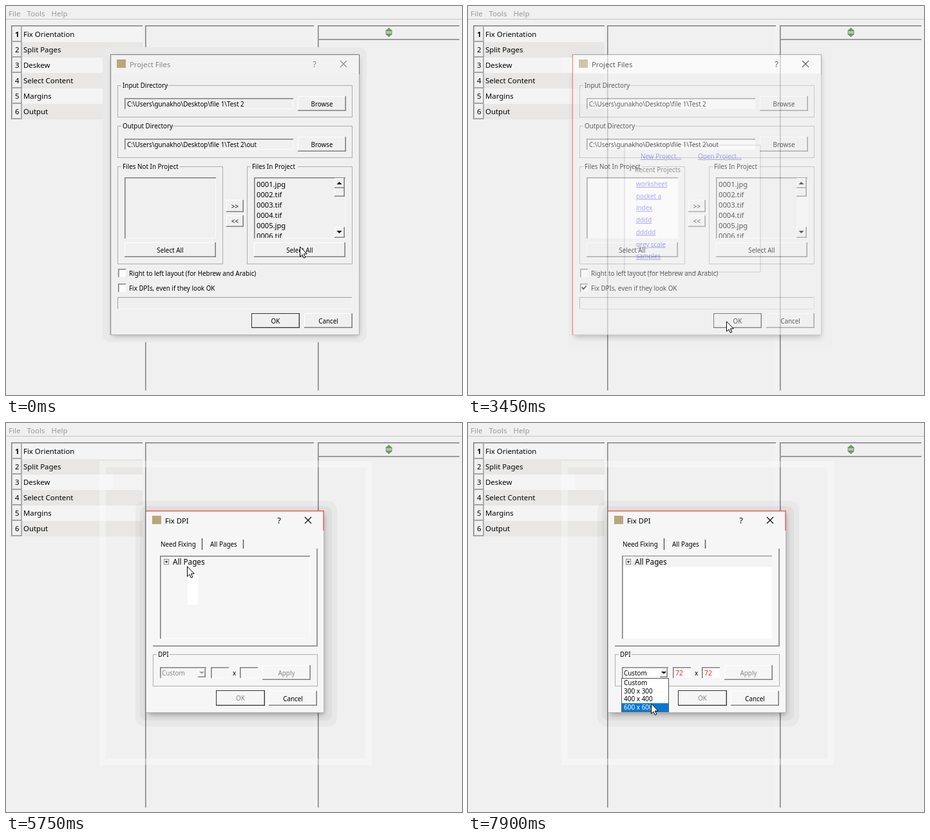
An HTML page that plays this animation: 708x604 px, repeating every 8 s.

```html
<!DOCTYPE html>
<html lang="en">
<head>
<meta charset="utf-8">
<title>Project setup</title>
<style>
html, body { margin: 0; width: 100%; height: 100%; overflow: hidden; background: #f0f0f0; }
svg { display: block; width: 708px; height: 604px; }
text { font-family: "Noto Sans", "Open Sans", sans-serif; white-space: pre; }
</style>
</head>
<body>
<svg id="stage" viewBox="0 0 708 604"></svg>
<script>
const LOOP = 8000;
const DARK = '#808080', BODY = '#f0f0f0', BLUE = '#0078d7', RED = '#f0463c';
const SMALL = 9.85, LARGE = 11.4;
const stage = document.getElementById('stage');

// Pointer rests: time, x, y
const pointer = [
  [0, 456, 373], [1780, 455, 376], [1930, 370, 393], [2060, 255, 424], [2180, 183, 438],
  [2640, 213, 442], [2760, 300, 461], [2880, 361, 474], [3030, 386, 484], [3160, 401, 489],
  [3570, 399, 484], [3690, 398, 481], [3810, 398, 477], [3950, 388, 459], [4080, 378, 447],
  [4230, 354, 412], [4380, 331, 394], [4500, 297, 373], [4630, 273, 360], [4770, 286, 263],
  [4930, 283, 236], [5080, 281, 228], [5210, 281, 222], [6150, 280, 232], [6270, 280, 278],
  [6420, 276, 310], [6540, 285, 352], [6660, 299, 382], [6810, 304, 387], [7300, 299, 405],
  [7450, 295, 423], [7600, 285, 434], [7900, 284, 435]
];

const rect = (x, y, w, h, fill, extra = '') =>
  `<rect x="${x}" y="${y}" width="${w}" height="${h}" fill="${fill}" ${extra}/>`;
const path = (d, stroke, width = 1, fill = 'none') =>
  `<path d="${d}" stroke="${stroke}" stroke-width="${width}" fill="${fill}"/>`;
const text = (x, y, str, size = SMALL, fill = '#000', extra = '') =>
  `<text x="${x}" y="${y}" font-size="${size}" fill="${fill}" ${extra}>${str}</text>`;
const centered = (x, y, str, size, fill) => text(x, y, str, size, fill, 'text-anchor="middle"');
const group = (opacity, body) => `<g opacity="${opacity}">${body}</g>`;

function sunken(x, y, w, h, fill) {
  return rect(x, y, w, h, fill) +
    path(`M${x} ${y + h - .5}H${x + w - .5}V${y}`, '#fbfbfb') +
    path(`M${x + .8} ${y + h}V${y + .8}H${x + w}`, DARK, 1.6);
}

function button(x, y, w, h, label, o = {}) {
  const shift = o.pressed ? 1 : 0;
  const edges = o.pressed
    ? path(`M${x + 1.5} ${y + h - 1}V${y + 1.5}H${x + w - 1}`, '#909090')
    : path(`M${x + .5} ${y + h - 1}V${y + .5}H${x + w - 1}`, '#fff') +
      path(`M${x} ${y + h - .8}H${x + w - .8}V${y}`, DARK, 1.6);
  const frame = o.focus ? rect(x + .5, y + .5, w - 1, h - 1, 'none', 'stroke="#333"') : '';
  return rect(x, y, w, h, o.fill || BODY) + edges + frame +
    centered(x + w / 2 + shift, y + h / 2 + 4 + shift, label, SMALL, o.off ? '#858585' : '#000');
}

function box(x, y, w, h, label, labelWidth, fill) {
  return rect(x + .5, y + .5, w, h, 'none', 'stroke="#adadad"') +
    rect(x + 6, y - 3, labelWidth, 7, fill) + text(x + 8, y + 4, label);
}

function checkbox(x, y, label, on) {
  return sunken(x, y, 12, 13, '#fdfdfd') +
    (on ? path(`M${x + 3} ${y + 5.5}l2.2 3 4.5-5`, '#000', 1.8) : '') + text(191, y + 11, label);
}

const arrow = (x, y, dir, fill = '#000') => `<path d="M${x - 4} ${y}h8l-4 ${4 * dir}z" fill="${fill}"/>`;

function titleBar(x, y, w, label, ink, fill) {
  const cx = x + w - 24, cy = y + 15;
  return rect(x, y, w, 30, fill) + rect(x + 10, y + 8, 14, 13, '#b8a67c') +
    text(x + 30, y + 19.5, label, 11.3, ink) +
    centered(cx - 45, y + 20, '?', 13, ink) +
    path(`M${cx - 5} ${cy - 5}l10 10m0-10l-10 10`, ink, 1.1);
}

function mainWindow() {
  let s = rect(0, 0, 708, 604, BODY);
  [['File', 4], ['Tools', 32.5], ['Help', 70.5]].forEach(([m, x]) => s += text(x, 15.5, m, 11.5, '#999'));
  s += path('M0 20.5H708', '#c4c4c4');
  ['Fix Orientation', 'Split Pages', 'Deskew', 'Select Content', 'Margins', 'Output'].forEach((name, i) => {
    const y = 32 + i * 24;
    s += rect(24, y, 188, 24, i % 2 ? '#e8e7e6' : '#f4f4f4') + rect(10, y, 14, 23, BODY) +
      path(`M10 ${y + 23}H24V${y}`, '#8b8b8b', 1.3) +
      text(14, y + 16, i + 1, LARGE, '#000', i ? '' : 'font-weight="700"') +
      text(27, y + 16, name, LARGE);
  });
  s += path('M8.8 176V30.8H212M216.8 597V30.8H478M484.8 51V30.8H704M484.8 597V52H704', DARK, 1.5);
  s += path('M478.5 31V597', '#f8f8f8') + rect(590, 38, 9, 6, '#b9bfb9', 'stroke="#777" stroke-width=".8"') +
    `<path d="M590.5 38l4-4 4 4zM590.5 44l4 4 4-4z" fill="#62b844" stroke="#3a7d2a" stroke-width=".7"/>`;
  return s;
}

function welcome() {
  const links = ['worksheet', 'pocket a', 'index', 'dddd', 'ddddd', 'grey scale', 'samples'];
  const blue = (x, y, str) => text(x, y, str, SMALL, '#2a2ae0', 'text-decoration="underline"');
  return rect(243, 216, 211, 197, '#f6f6f6', 'stroke="#999"') +
    blue(268, 237, 'New Project...') + blue(357, 237, 'Open Project...') +
    text(259, 258, 'Recent Projects') +
    links.map((l, i) => blue(261, 280 + i * 18.7, l)).join('');
}

function softShadow(x, y, w, h) {
  return rect(x, y, w, h, '#000', 'opacity=".36" filter="url(#soft)"');
}

function projectDialog(t) {
  const active = t >= 1240, field = active ? '#fdfdfd' : BODY;
  const checked = t >= 2490, chosen = t >= 1390;
  const root = 'C:\\Users\\gunakho\\Desktop\\file 1\\Test 2';
  let s = active
    ? rect(153, 63, 414, 468, '#000', 'rx="10" opacity=".012"') + softShadow(165, 80, 383, 434) +
      rect(145, 80, 17, 24, '#f8f8f8')
    : rect(150, 64, 410, 458, '#e9e9e9', 'rx="12"') + softShadow(166, 80, 381, 431);
  s += rect(162, 75, 387, 436, BODY);
  s += titleBar(162, 75, 386, 'Project Files', active ? '#000' : '#858585', active ? '#fff' : '#f2f2f2');
  s += path('M162 75.5H548.5V106', '#777') + path('M548.5 106V510.5H162', '#b5b5b5') +
    path('M162.5 75V511', active ? RED : '#888', 1.2);

  s += box(173, 123, 364, 49, 'Input Directory', 71, BODY) + sunken(184, 143, 262, 17, field) +
    text(188, 156, root) + button(453, 140, 75, 23, 'Browse');
  s += box(173, 186, 364, 49, 'Output Directory', 79, BODY) + sunken(184, 206, 262, 17, field) +
    text(188, 219, root + '\\out') + button(453, 203, 75, 23, 'Browse');

  s += box(173, 249, 163, 151, 'Files Not In Project', 91, BODY) + sunken(184, 266, 142, 95, field) +
    button(184, 367, 142, 23, 'Select All');
  s += button(342, 301, 27, 19, '&gt;&gt;') + button(342, 325, 27, 18, '&lt;&lt;');

  s += box(374, 249, 163, 151, 'Files In Project', 73, BODY) + sunken(385, 266, 142, 95, chosen ? BODY : field);
  for (let i = 1; i <= 6; i++)
    s += text(389, 264.5 + i * 16, `000${i}.${i % 4 === 1 ? 'jpg' : 'tif'}`, 11.2, '#000', 'clip-path="url(#list)"');
  s += rect(510, 267, 16, 93, active ? '#f7f7f7' : BODY) + button(510, 267, 16, 16, '') +
    button(510, 283, 16, 13, '') + button(510, 343, 16, 17, '') + arrow(517.5, 277, -1) + arrow(517.5, 349, 1);
  s += button(385, 367, 142, 23, 'Select All', { pressed: active && t < 1510, focus: active && !checked });

  s += checkbox(174, 408, 'Right to left layout (for Hebrew and Arabic)', false) +
    checkbox(174, 431, 'Fix DPIs, even if they look OK', checked);
  s += path('M173.5 470V452.5H538', '#9d9d9d') + path('M173.5 470.5H537.5V452', active ? '#d2d2d2' : '#f8f8f8');
  s += button(381, 477, 75, 23, 'OK', { focus: !active || checked, pressed: t >= 3310 && t < 3450 }) +
    button(463, 477, 75, 23, 'Cancel');
  return s;
}

function popup(t) {
  const row = t < 7300 ? 0 : t < 7450 ? 1 : t < 7900 ? 2 : 3;
  const items = ['Custom', '300 x 300', '400 x 400', '600 x 600'];
  return rect(238.5, 396.5, 73, 52, '#fff', 'stroke="#555"') +
    rect(239, 397 + row * 12.7, 72, 12.8, BLUE) +
    items.map((n, i) => text(242, 407 + i * 12.7, n, 10, i === row ? '#fff' : '#000')).join('');
}

function dpiDialog(t) {
  const body = '#f6f6f6', ready = t >= 5870, open = t >= 7060, rowBlue = ready && !open;
  const field = ready ? '#fff' : body, ink = ready ? '#000' : '#858585';
  let s = rect(218, 137, 275, 313, body) + titleBar(217, 136, 276, 'Fix DPI', '#000', body);
  s += path('M217.5 137V449.5H493.5V167', '#bbb') + path('M217 136.6H493V167', RED, 1.2);
  if (t < 3810) s += path('M218.2 137V450', RED, 1.2);

  s += text(240, 191.5, 'Need Fixing') + text(317, 192, 'All Pages') +
    path('M304.5 179V197M368.5 181V195', '#555', 1.4) + path('M483 195V346.3H228', DARK, 1.6);
  s += sunken(239, 206, 233, 129, field);
  if (t >= 4930 && !ready) s += rect(282, 236, 16, 46, '#fff');
  if (ready) s += rowBlue ? rect(257, 207, 215, 16, BLUE) : rect(241, 207, 231, 16, '#f3f3f3');
  s += rect(245.5, 211.5, 7, 8, '#fff', 'stroke="#888"') + path('M247 215.5H251M249 213.5V217.5', '#000') +
    text(259, 220, 'All Pages', 11.7, rowBlue ? '#fff' : '#000');

  s += box(228, 359, 255, 49, 'DPI', 20, body) + sunken(239, 379, 72, 17, field) + text(242, 391.5, 'Custom', SMALL, ink);
  s += button(298, 381, 12, 14, '', { fill: body, pressed: open && t < 7300 }) + arrow(304, 386, .9, ready ? '#000' : '#999');
  s += sunken(318, 379, 28, 17, field) + sunken(363, 379, 28, 17, field) + text(352, 391.5, 'x');
  if (ready) s += text(322, 391.5, '72', 10.4, '#f22') + text(367, 391.5, '72', 10.4, '#f22');
  s += button(398, 376, 75, 23, 'Apply', { fill: body, off: true });
  s += button(326, 415, 76, 24, 'OK', { fill: body, off: true, focus: true }) +
    button(408, 416, 75, 23, 'Cancel', { fill: body });
  return open ? s + popup(t) : s;
}

function dpiShadow() {
  return rect(150, 64, 413, 462, 'none', 'stroke="#fff" stroke-width="10" opacity=".3"') +
    rect(145, 80, 21, 24, '#f7f7f7') +
    rect(201, 121, 313, 350, '#000', 'rx="14" opacity=".035"') +
    rect(208, 129, 298, 333, '#000', 'rx="10" opacity=".04"') + softShadow(221, 141, 272, 311);
}

function cursor(t) {
  const [, x, y] = pointer.filter(p => p[0] <= t).pop();
  return `<path transform="translate(${x} ${y})" d="M.5.8V16.3L4 13 6.4 18.4 8.8 17.3 6.4 12H11.3Z" fill="#fff" stroke="#000" stroke-linejoin="round"/>`;
}

const defs = `<defs><filter id="soft" x="-10%" y="-10%" width="120%" height="120%"><feGaussianBlur stdDeviation="4"/></filter>
<clipPath id="list"><path d="M385 267H510V360H385z"/></clipPath></defs>`;

function scene(t) {
  let s = defs + mainWindow();
  if (t >= 3450 && t < 3810) s += welcome();
  if (t < 3450) s += projectDialog(t);
  else if (t < 3570) s += group(.6, projectDialog(t));
  else if (t < 3690) s += group(.12, projectDialog(t));
  else s += dpiShadow() + group(t < 3810 ? .88 : 1, dpiDialog(t));
  return s + cursor(t);
}

const start = performance.now();
let shown = '';
function draw() {
  const next = scene(Math.max(0, performance.now() - start) % LOOP);
  if (next !== shown) stage.innerHTML = shown = next;
  requestAnimationFrame(draw);
}
draw();
</script>
</body>
</html>
```
